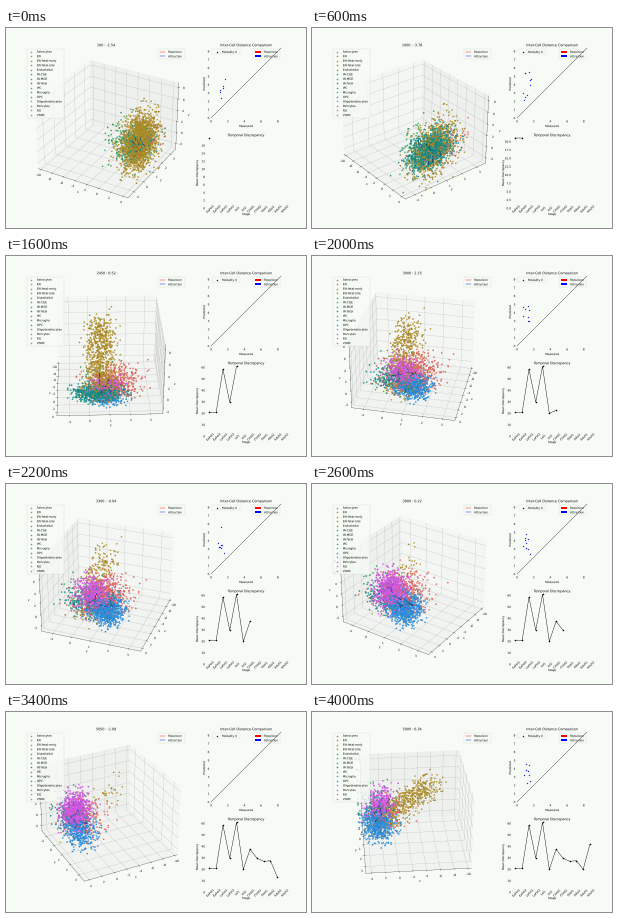
These frames come from a looping animation (300x200 px, 4.2 s). A matplotlib script:

```python
import numpy as np
import matplotlib.pyplot as plt
from matplotlib.animation import FuncAnimation
from matplotlib.colors import to_rgb
from matplotlib.patches import PathPatch, Rectangle
from matplotlib.textpath import TextPath
from matplotlib.transforms import Affine2D

FRAMES, INTERVAL = 21, 200
STEPS_PER_FRAME, STEPS_PER_STAGE = 290, 500
BG = "#f6fbf5"
GOLD, TEAL, BLUE, VIOLET = "#b8962c", "#1a9490", "#2d96ea", "#dc5cf0"
SALMON, GREEN = "#ee6b62", "#35b060"

CELL_TYPES = {
    "Astrocytes": SALMON, "EN": "#e2793a", "EN-fetal-early": GOLD,
    "EN-fetal-late": "#98a22f", "Endothelial": "#5fae32", "IN-CGE": GREEN,
    "IN-MGE": "#33ae86", "IN-fetal": TEAL, "IPC": "#36a9b4",
    "Microglia": "#38a5d0", "OPC": BLUE, "Oligodendrocytes": "#8d8ff2",
    "Pericytes": VIOLET, "RG": "#f25fdc", "VSMC": "#f668a8",
}
STAGES = ["EaFet1", "EaFet2", "LaFet1", "LaFet2", "Inf1", "Inf2",
          "Child1", "Child2", "Adol1", "Adol2", "Adult1", "Adult2"]
DISCREPANCY = [21, 21, 58.4, 29.8, 61, 20, 37.5, 29.8, 27, 27.5, 20, 42]
SCORE_FRAMES = [0, 5, 8, 11, 13, 17, 20]
SCORES = [-1.54, -5.27, 6.52, -0.04, 0.22, -1.09, 6.34]

plt.rcParams.update({"figure.facecolor": BG, "axes.facecolor": BG,
                     "text.hinting": "none"})
fig = plt.figure(figsize=(15, 10), dpi=20)

space = fig.add_axes([20 / 300, 0.1, 160 / 300, 0.8], projection="3d",
                     computed_zorder=False, zorder=1)
space.set(xlim=(-10.5, 4.8), ylim=(-1.6, 3.6), zlim=(-3, 8.8),
          xticks=range(-10, 5, 2), yticks=range(-1, 4), zticks=range(-2, 9, 2),
          xlabel="x", ylabel="y", zlabel="z")


def pixel_layer(zorder):
    layer = fig.add_axes([0, 0, 1, 1], zorder=zorder)
    reset(layer)
    return layer


def reset(layer):
    layer.cla()
    layer.set(xlim=(0, 300), ylim=(200, 0))
    layer.axis("off")


def write(layer, x, y, text, size=2.85, align=0.0, angle=0):
    """Draw text around its middle height; align is 0 left, .5 centre, 1 right."""
    path = TextPath((0, 0), text, size=size)
    width = path.get_extents().x1
    place = (Affine2D().translate(-align * width, -0.365 * size)
             .rotate_deg(angle).scale(1, -1).translate(x, y))
    layer.add_patch(PathPatch(path, fc="black", lw=0,
                              transform=place + layer.transData))


def box(layer, x, y, w, h, **style):
    layer.add_patch(Rectangle((x, y), w, h, **style))


def legend_box(layer, x, y, w, h):
    box(layer, x, y, w, h, fc=BG, ec="#cccccc", lw=1, alpha=0.8)


def draw_static(layer):
    legend_box(layer, 21.4, 21.4, 37, 68.6)
    for i, (name, color) in enumerate(CELL_TYPES.items()):
        y = 23.6 + 4.53 * i
        layer.scatter(25.4, y, s=20, color=color)
        write(layer, 30.8, y, name)

    legend_box(layer, 152, 21.4, 26.6, 9.6)
    legend_box(layer, 246.5, 21.4, 27.4, 9.6)
    for y, name, color in [(23.8, "Repulsion", "red"), (28.3, "Attraction", "blue")]:
        layer.plot([153.5, 159.3], [y, y], color=color, lw=1.5)
        write(layer, 162, y, name)
        box(layer, 248.5, y - 1, 6.5, 2, fc=color, lw=0)
        write(layer, 258, y, name)
    legend_box(layer, 206.4, 21.4, 28, 5)
    layer.scatter(211, 24, s=28, marker="*", color="black")
    write(layer, 216, 23.9, "Modality 0")

    write(layer, 240, 17, "Inter-Cell Distance Comparison", 3.33, 0.5)
    write(layer, 240, 98, "Measured", align=0.5)
    write(layer, 198, 56, "Predicted", align=0.5, angle=90)
    layer.plot([205, 275], [90, 20], color="black", lw=1.1)
    for v in range(9):
        write(layer, 203.2, 90 - 8.33 * v, str(v), align=1)
        if v % 2 == 0:
            write(layer, 205 + 8.33 * v, 93.3, str(v), align=0.5)

    write(layer, 240, 107, "Temporal Discrepancy", 3.33, 0.5)
    write(layer, 240, 186, "Stage", align=0.5)
    write(layer, 191, 145, "Mean Discrepancy", align=0.5, angle=90)
    for i, name in enumerate(STAGES):
        write(layer, stage_x(i) + 0.5, 181, name, align=0.5, angle=45)


def stage_x(i):
    return 203.4 + 6.78 * i


def bump(k, peak, width):
    return np.exp(-((k - peak) / width) ** 2)


def cell_groups(k):
    """Yield colour, count, centre, spread and arm length of each cell group."""
    wide, tall = bump(k, 5, 2), bump(k, 8, 2)
    arm = np.clip((k - 5) / 3, 0, 1)
    z = 2.6 - 1.2 * wide - 2.8 * tall
    flat = 1 - 0.7 * tall
    yield (GREEN, 110 * bump(k, 0, 5) + 30, (1.5, 0.3, z), (1.5, 0.6, 2), 0)
    yield (GOLD, 2000 * bump(k, 0, 3) + 900 * bump(k, 8, 3) + 700 * bump(k, 20, 2),
           (3, 0.6, z * (1 - arm)), (0.9, 0.7 - 0.3 * arm, 2.1 - 1.2 * arm), arm)
    yield (TEAL, 1700 * bump(k, 5, 3) + 150, (2.8, 0.5, z), (1, 0.6, 1.2 * flat), 0)
    yield (SALMON, 450 * bump(k, 10, 5) + 80,
           (2.3, 1.2, z - 0.5), (1.2, 0.7, 1.3 * flat), 0.35 * arm)
    yield (BLUE, 800 * bump(k, 12, 4) + 500 * bump(k, 20, 3),
           (2.5, 1.7 - 0.8 * tall, z - 0.9), (1.2, 0.4, 1.2 * flat), 0)
    yield (VIOLET, 1100 * bump(k, 15, 5), (2.2, 0.8, z + 1), (1.1, 0.4, 1.4 * flat), 0)


def draw_cells(k):
    points, colors = [], []
    for seed, (color, count, centre, spread, arm) in enumerate(cell_groups(k)):
        rng = np.random.default_rng(seed)
        unit = np.clip(rng.normal(size=(2200, 3)), -2.6, 2.6)
        unit[:, 2] += 0.9 * bump(k, 5, 2) * unit[:, 1]
        reach = arm * rng.uniform(size=(2200, 1)) ** 1.3
        shade = rng.uniform(0.85, 1.03, (2200, 1))
        cells = centre + unit * spread + reach * (-9, 0, 7)
        points.append(cells[:int(count)])
        colors.append(np.clip(shade * to_rgb(color), 0, 1)[:int(count)])
    points, colors = np.vstack(points), np.vstack(colors)
    order = np.random.default_rng(9).permutation(len(points))

    for old in list(space.collections):
        old.remove()
    space.scatter(*points[order].T, s=20, c=colors[order], depthshade=False, zorder=3)

    rng = np.random.default_rng(40 + k)
    starts = np.median(points, axis=0) + rng.normal(size=(7, 3)) * (0.5, 0.3, 0.7)
    moves = rng.normal(size=(7, 3)) * (0.4, 0.2, 0.9)
    space.quiver(*starts.T, *moves.T, color="#14306e", lw=1.3, zorder=4)


def draw_pairs(k):
    """Scatter distances; their number swells and empties every nine frames."""
    rng = np.random.default_rng(70 + k)
    count = round(10 * np.sqrt(abs(np.sin(np.pi * (k + 1) / 9))))
    live.scatter(rng.uniform(211, 219, count), rng.normal(58, 8, count),
                 s=14, color="#1a1ae0")


def draw_discrepancy(progress):
    stage, within = divmod(progress, STEPS_PER_STAGE)
    values = np.array(DISCREPANCY[:stage + 1], float)
    values[-1] *= min(1, 0.6 + within / 400)  # a new stage needs time to settle
    top = values.max()
    scale = 70 / top
    gap = 2 if top < 18 else 2.5 if top < 22.5 else 10
    for v in np.arange(0, top, gap):
        label = f"{v:.1f}" if gap == 2.5 else f"{v:.0f}"
        write(live, 198.8, 180.3 - v * scale, label, align=1)
    live.plot(stage_x(np.arange(stage + 1)), 180.3 - values * scale,
              "o-", color="black", lw=1.5, ms=5.5, mew=0)


def draw(k):
    progress = 100 + STEPS_PER_FRAME * k
    step = 50 * -(-progress // 50)
    space.view_init(elev=30, azim=-60 + (progress - 100) / 40)
    reset(live)
    score = np.interp(k, SCORE_FRAMES, SCORES)
    write(live, 100, 17, f"{step} : {score:.2f}", 3.33, 0.5)
    draw_cells(k)
    draw_pairs(k)
    draw_discrepancy(progress)
    return []


live = pixel_layer(2)
draw_static(pixel_layer(3))
anim = FuncAnimation(fig, draw, frames=FRAMES, interval=INTERVAL,
                     init_func=lambda: [], repeat=True, repeat_delay=0)
plt.show()
```
